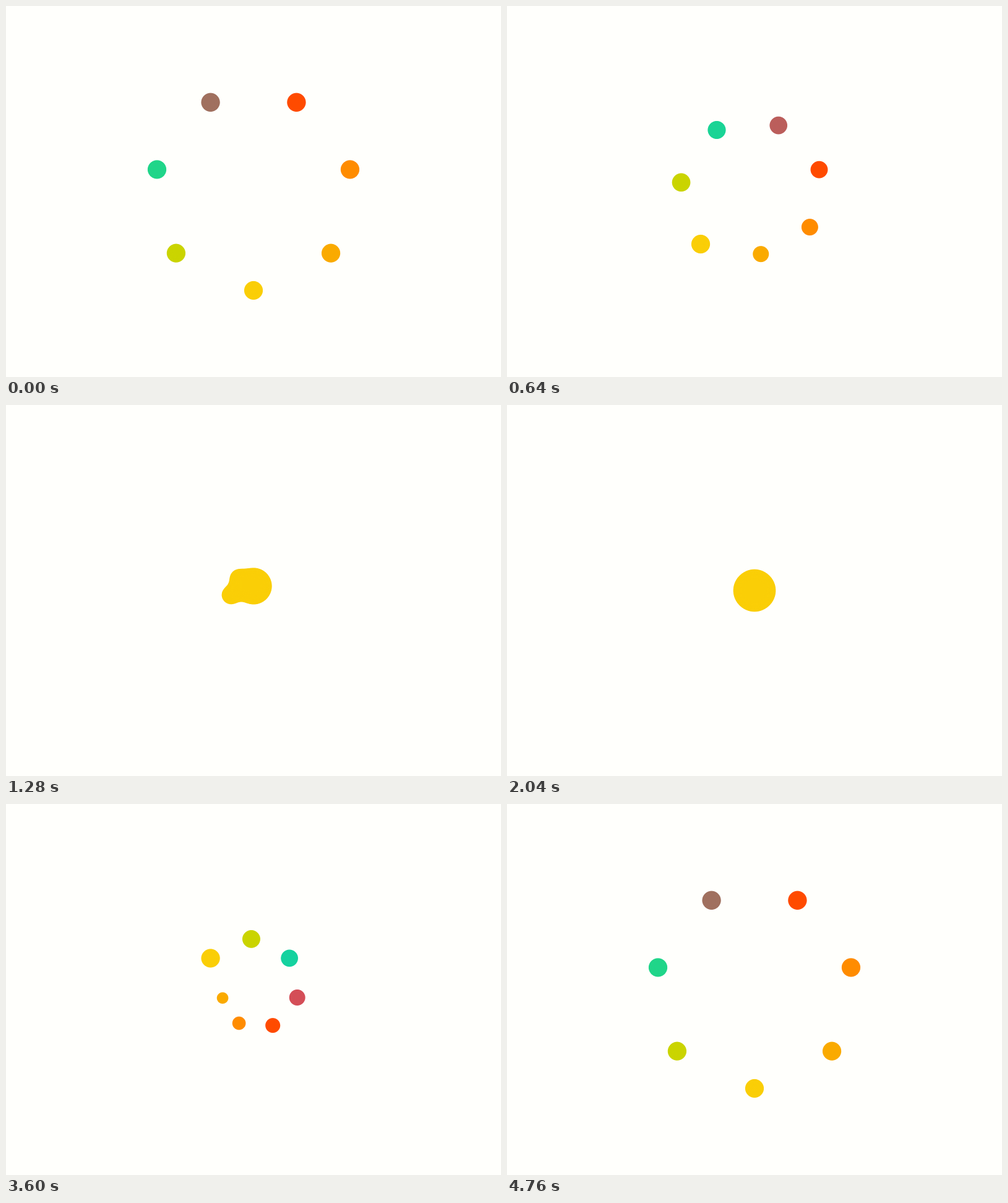
These frames come from a looping animation (800x600 px, 4800 ms). An HTML page:

```html
<!DOCTYPE html>
<html>
<head>
<meta charset="utf-8">
<style>
  html, body { margin: 0; width: 100%; height: 100%; overflow: hidden; background: #fffffc; }
  svg { display: block; width: 800px; height: 600px; }
</style>
</head>
<body>
<svg viewBox="0 0 800 600">
  <filter id="goo" filterUnits="userSpaceOnUse" x="0" y="0" width="800" height="600" color-interpolation-filters="sRGB">
    <feGaussianBlur stdDeviation="7"/>
    <feColorMatrix values="1 0 0 0 0  0 1 0 0 0  0 0 1 0 0  0 0 0 20 -7.6"/>
  </filter>
  <g id="dots" filter="url(#goo)"></g>
</svg>
<script>
const LOOP = 4800, STEP = 40, HALF = LOOP / 2;
const RING = 160, DOT = 15, HEAD = 6;
const clamp = x => Math.max(0, Math.min(1, x));
const mix = (a, b, k) => a + (b - a) * k;
const mixAll = (a, b, k) => a.map((v, i) => mix(v, b[i], k));
const smooth = (t, a, b) => { const k = clamp((t - a) / (b - a)); return k * k * (3 - 2 * k); };

// Colour on the outer ring and, where it drifts, near the centre; the last one is the head
const yellow = [250, 206, 6];
const colors = [
  [[250, 170, 0]],
  [[255, 140, 0]],
  [[255, 75, 0]],
  [[160, 112, 95], [255, 50, 80]],
  [[32, 213, 137], [10, 208, 180]],
  [[202, 212, 0]],
  [yellow]
];

const group = document.getElementById('dots');
const circles = colors.map(() => group.appendChild(document.createElementNS('http://www.w3.org/2000/svg', 'circle')));

const spin = t => 200 * (smooth(t, 245, 1521) - smooth(t, 3091, 4326));

// Distance from the centre: a small swing outwards, then an eased spiral; later dots run slower
function orbit(i, t) {
  const [u, span, rest] = t < HALF ? [t - 245, 1600, 245] : [4243 - t, 1271, 457];
  if (u < 0) return RING + 5 * Math.sin(Math.PI * clamp(-u / rest));
  return RING * (1 - clamp(u / (1 + .095 * i) / span)) ** 1.6;
}

// 1 when dot i moves on its own, 0 when it is inside the head
function freedom(i, t) {
  if (t < HALF) {
    const end = 1440 - 80 * i;
    return 1 - smooth(t, end - 70 - 20 * i, end);
  }
  const start = 2640 + 40 * (5 - i);
  return smooth(t, start, start + 600);
}

// How far the head itself keeps away from the centre
const headFreedom = t => t < HALF ? 1 - smooth(t, 800, 1400) : smooth(t, 2960, 3480);

function place(i, r, t) {
  const a = (90 - (i + 1) % 7 * 360 / 7 + spin(t)) * Math.PI / 180;
  return [400 + r * Math.cos(a), 300 + r * Math.sin(a)];
}

function paint(i, [x, y], r, rgb) {
  const c = circles[i];
  c.setAttribute('cx', x);
  c.setAttribute('cy', y);
  c.setAttribute('r', r);
  c.setAttribute('fill', `rgb(${rgb.map(Math.round)})`);
}

function draw(t) {
  const headOrbit = orbit(HEAD, t);
  const head = place(HEAD, headOrbit * headFreedom(t), t);
  // The head gains area from every dot it holds
  let held = 0;
  for (let i = 0; i < HEAD; i++) held += 1 - freedom(i, t);
  const headR = DOT * Math.sqrt(1 + .66 * held);

  for (let i = 0; i < HEAD; i++) {
    const r = orbit(i, t);
    const pos = mixAll(head, place(i, r, t), freedom(i, t));
    const gap = Math.hypot(pos[0] - head[0], pos[1] - head[1]) - headR - DOT;
    const apart = clamp(gap / 18);
    const thin = DOT * (r / headOrbit) ** .75;
    const [outer, inner = outer] = colors[i];
    paint(i, pos, mix(DOT, thin, apart), mixAll(yellow, mixAll(inner, outer, r / RING), apart));
  }
  paint(HEAD, head, headR, yellow);
}

const begin = performance.now();
function frame() {
  const t = Math.max(0, performance.now() - begin) % LOOP;
  draw(Math.floor(t / STEP) * STEP);
  requestAnimationFrame(frame);
}
frame();
</script>
</body>
</html>
```
